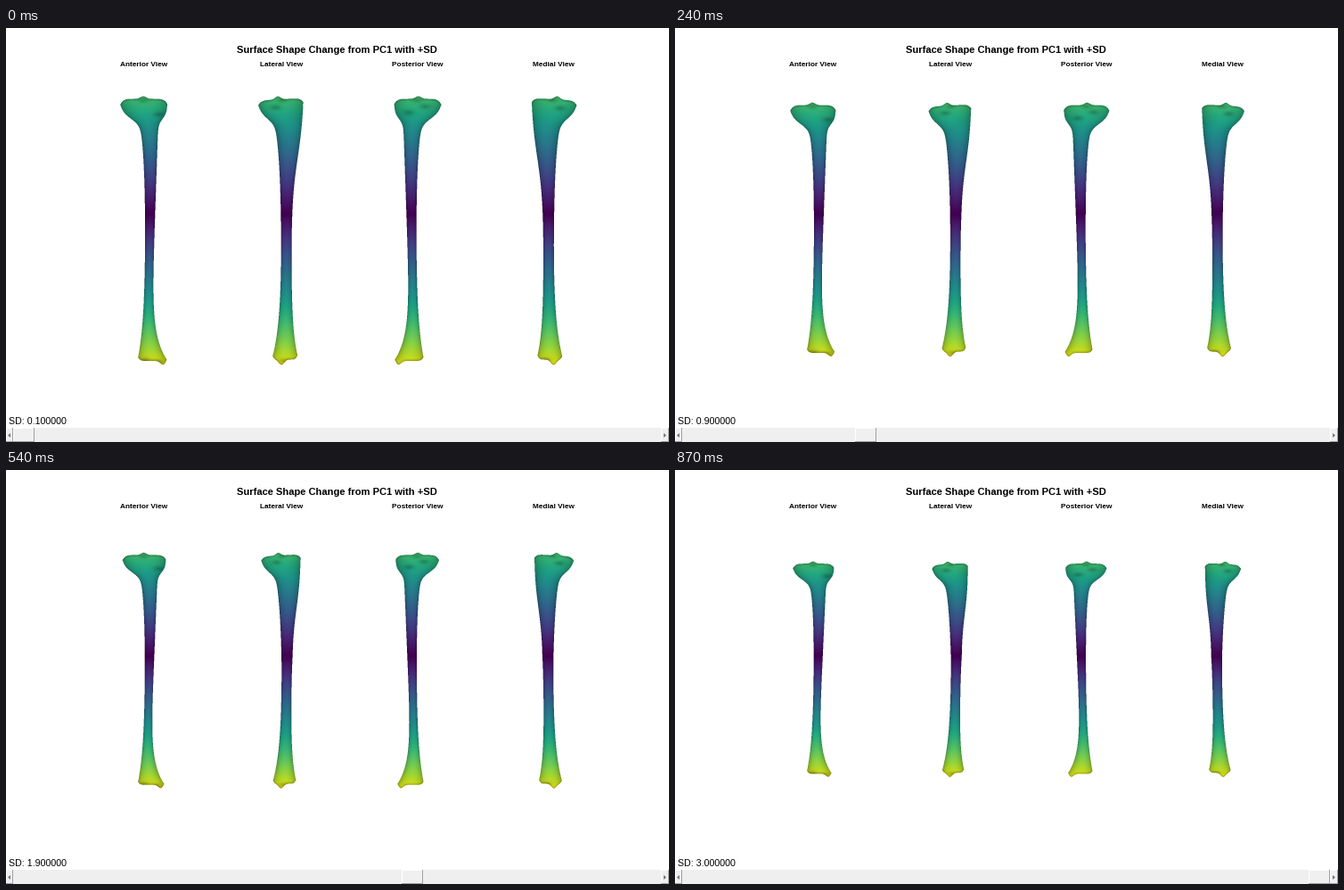
Animation, 744 px wide and 465 px high, one loop 0.9 s. Source, as a matplotlib script:

```python
import numpy as np
import matplotlib.pyplot as plt
from matplotlib.animation import FuncAnimation
from matplotlib.patches import Polygon, Rectangle

W, H, DPI = 744, 465, 93
FRAMES, STEP_MS = 30, 30
MID = 209               # height that stays still
TOP, BOTTOM = 70, 386   # rows that hold the bones
SS = 3                  # supersampling


def edge(side, mid, lean, head, flare, foot):
    """Side outline x(v): straight shaft, S-shaped head, exponential flares."""
    size, neck, soft = head
    spread, reach = foot

    def x(v):
        out = size / (1 + np.exp((v - neck) / soft))
        out += flare * np.exp(-(v - 86) / 42)
        out += spread * np.exp((v - 372) / reach)
        return mid + lean * (v - MID) + side * out
    return x


def cap(level, tilt, centre, half, peak, bump):
    """End outline y(u): flat, rounded at the corners, with one bump."""
    def y(u):
        t = (u - centre) / half
        corner = np.sign(bump) * 5.5 * np.minimum(t * t, 1.5) ** 4
        return level + tilt * t + bump * np.exp(-((u - peak) / 4.3) ** 2) - corner
    return y


FRONT = dict(
    left=edge(-1, 156.8, 0, head=(18, 102, 4), flare=11, foot=(9, 45)),
    right=edge(1, 167.3, -.035, head=(9.5, 102, 3.5), flare=0, foot=(18.5, 28)),
    top=cap(79.5, 0, 154.8, 26, peak=154, bump=-3),
    bottom=cap(374, 0, 164.5, 16.8, peak=176.5, bump=4.5),
    pivot=162, shift=(-.16, -1, -2.1), squeeze=(-.126, -.1, -.15))

SIDE = dict(
    left=edge(-1, 309.3, .01, head=(14.5, 102, 4), flare=11, foot=(12.5, 45)),
    right=edge(1, 320.2, 0, head=(14.5, 145, 25), flare=0, foot=(8, 30)),
    top=cap(80, -1.5, 308.5, 25.5, peak=305, bump=-3.5),
    bottom=cap(372.5, 0, 313, 14.2, peak=309, bump=6),
    pivot=314, shift=(-.85, .9, -1.2), squeeze=(-.2, -.05, -.125))

# Outline, mirror sum, label, label centre and centres of dark hollows.
VIEWS = [
    (FRONT, None, "Anterior View", 154.5, [(154, 81), (172, 97), (156, 373), (172, 375)]),
    (SIDE, None, "Lateral View", 309, [(309, 81), (303, 89), (312, 374)]),
    (FRONT, 616.7, "Posterior View", 461.5, [(462, 81), (452, 95), (470, 88)]),
    (SIDE, 923.5, "Medial View", 614.5, [(614, 81), (622, 90), (606, 373)]),
]


def heat(v):
    """Colour value grows with the distance from the still height."""
    up, down = np.maximum(MID - v, 0), np.maximum(v - MID, 0)
    return .7 * (up / 130) ** 1.1 + .95 * down / 167


def draw_bone(canvas, view, p):
    shape, mirror, _, centre, hollows = view
    x0, x1 = int(centre) - 36, int(centre) + 36
    xs = x0 + (np.arange((x1 - x0) * SS) + .5) / SS
    ys = TOP + (np.arange((BOTTOM - TOP) * SS) + .5) / SS
    x, y = np.meshgrid(xs, ys)
    if mirror:
        x = mirror - x

    # Undo the shape change to reach the resting outline.
    v = MID + (y - MID) / (1 - .198 * p)
    knots = (90, MID, 365)
    shift = p * np.interp(v, knots, shape["shift"])
    scale = 1 + p * np.interp(v, knots, shape["squeeze"])
    u = shape["pivot"] + (x - shape["pivot"] - shift) / scale

    left, right = shape["left"](v), shape["right"](v)
    top, bottom = shape["top"](u), shape["bottom"](u)
    inside = (u > left) & (u < right) & (v > top) & (v < bottom)

    t = np.clip((2 * u - left - right) / (right - left), -1, 1)
    shade = .62 + .36 * np.sqrt(1 - t * t)
    shade *= .75 + .25 * np.clip(np.minimum(v - top, bottom - v) / 3, 0, 1)
    for cx, cy in hollows:
        cx = mirror - cx if mirror else cx
        shade *= 1 - .22 * np.exp(-((u - cx) / 6) ** 2 - ((v - cy) / 3) ** 2)

    rgb = plt.cm.viridis(heat(v))[..., :3] * shade[..., None]
    rgb = np.where(inside[..., None], rgb, 1)
    rows, cols = BOTTOM - TOP, x1 - x0
    canvas[:, x0:x1] = rgb.reshape(rows, SS, cols, SS, 3).mean(axis=(1, 3))


def render(p):
    canvas = np.ones((BOTTOM - TOP, W, 3))
    for view in VIEWS:
        draw_bone(canvas, view, p)
    return canvas


fig = plt.figure(figsize=(W / DPI, H / DPI), dpi=DPI, facecolor="white")
ax = fig.add_axes([0, 0, 1, 1])
ax.axis("off")
image = ax.imshow(render(0), extent=(0, W, BOTTOM, TOP), interpolation="nearest", aspect="auto")
ax.set_xlim(0, W)
ax.set_ylim(H, 0)


def label(x, y, s, px, **kw):
    return ax.text(x, y, s, fontsize=px * 72 / DPI, family="Liberation Sans",
                   color="black", va="baseline", **kw)


def box(x, y, w, h, color):
    return ax.add_patch(Rectangle((x, y), w, h, facecolor=color, linewidth=0,
                                  antialiased=False, zorder=3))


def raised(x, w):
    """Scroll bar button: light top left, grey bottom right."""
    return [box(x, 449, w, 16, "#a0a0a0"), box(x, 449, w - 1, 15, "white"),
            box(x + 1, 450, w - 2, 14, "#f0f0f0")]


label(371.5, 28, "Surface Shape Change from PC1 with +SD", 11.1, weight="bold", ha="center")
for _, _, name, centre, _ in VIEWS:
    label(centre, 43, name, 8.2, weight="bold", ha="center")
readout = label(3, 445, "", 10.6, ha="left")

box(0, 449, W, 16, "#efefef")
for x, w, tip, base in ((0, 8, 2, 5), (735, 9, 741, 738)):
    raised(x, w)
    ax.add_patch(Polygon([(tip, 457.5), (base, 455), (base, 460)],
                         facecolor="#777777", linewidth=0, zorder=4))
thumb = raised(8, 24)
thumb_offsets = [part.get_x() for part in thumb]


def update(k):
    image.set_data(render(k / (FRAMES - 1)))
    readout.set_text(f"SD: {(k + 1) / 10:.6f}")
    for part, x in zip(thumb, thumb_offsets):
        part.set_x(x + round(24.25 * k))
    return [image, readout, *thumb]


anim = FuncAnimation(fig, update, frames=FRAMES, interval=STEP_MS,
                     repeat=True, repeat_delay=0, blit=False)
plt.show()
```
